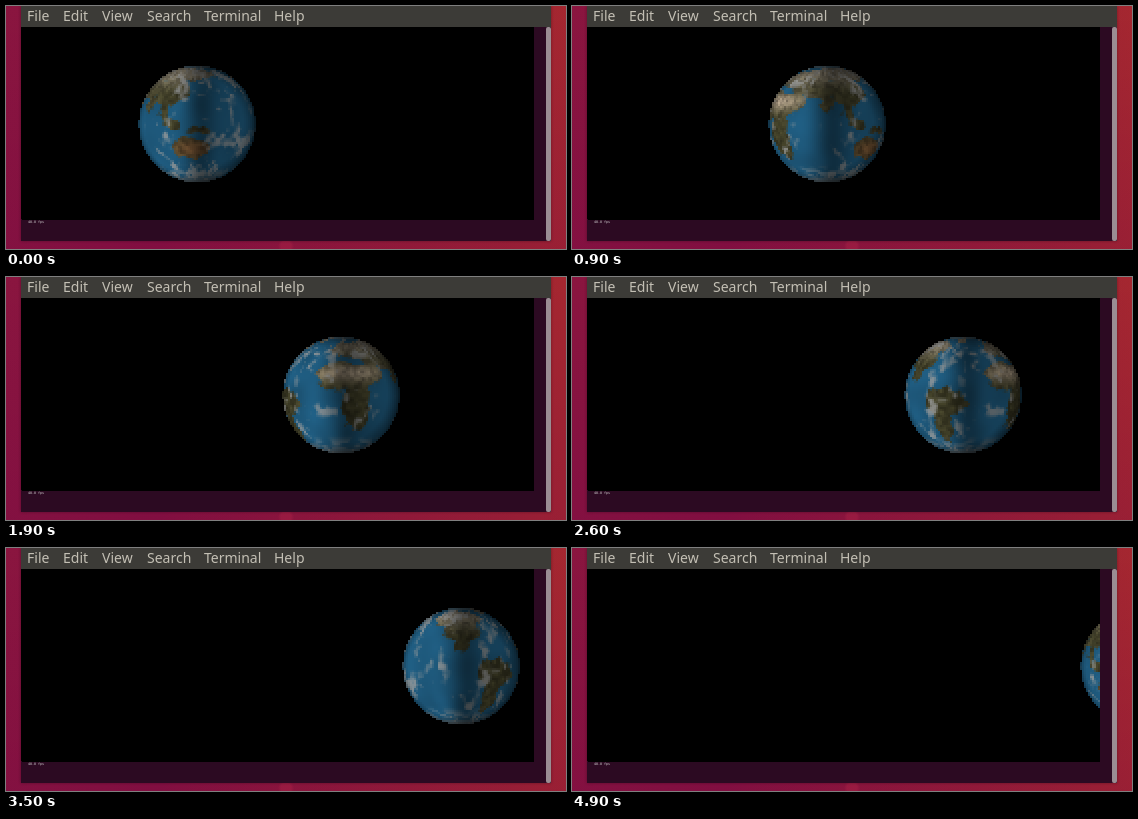
An HTML page with a canvas that plays this animation: 560x243 px, repeating every 5 s.

```html
<!DOCTYPE html>
<html lang="en">
<head>
<meta charset="utf-8">
<title>Globe in a terminal</title>
<style>
  html, body { margin: 0; width: 100%; height: 100%; overflow: hidden; }
  body {
    position: relative;
    background:
      radial-gradient(circle at 280px 240px, #b8284a50 0 5px, transparent 8px),
      linear-gradient(to top, #6c004838, transparent),
      linear-gradient(95deg, #8a153f, #87123f 30%, #a6282f);
  }
  body > * { position: absolute; }
  #window { left: 15px; top: 0; width: 530px; height: 235px; background: #2c0a22; box-shadow: 0 0 3px #0005; }
  #menu {
    left: 15px; top: 0; width: 530px; height: 21px;
    background: #3c3b37; font: 14px/20px "Noto Sans", sans-serif; color: #c3bfb4;
  }
  #menu span { position: absolute; top: 0; }
  #scrollbar { left: 540px; top: 21px; width: 5px; height: 214px; background: #9a8d93; border-radius: 2px; }
  canvas {
    left: 16px; top: 22px; width: 512px; height: 192px;
    background: #000; box-shadow: -1px -1px #000, 0 -1px #000; image-rendering: pixelated;
  }
  #fps { left: 22px; top: 214px; font: 3.32px/4px "DejaVu Sans Mono", monospace; color: #ddd; white-space: pre; }
</style>
</head>
<body>
<div id="window"></div>
<div id="menu">
  <span style="left:6px">File</span>
  <span style="left:42px">Edit</span>
  <span style="left:81px">View</span>
  <span style="left:126px">Search</span>
  <span style="left:183px">Terminal</span>
  <span style="left:253px">Help</span>
</div>
<div id="scrollbar"></div>
<canvas id="screen" width="256" height="96"></canvas>
<div id="fps">48.8 fps</div>
<script>
const RADIUS = 29.2, START_X = 87.6, CENTER_Y = 48, DEGREES = 180 / Math.PI;
const screen2d = document.getElementById('screen').getContext('2d');
const mix = (a, b, t) => a + (b - a) * t;
const blend = (a, b, t) => a.map((v, i) => mix(v, b[i], t));
const bell = (v, center, width) => Math.exp(-(((v - center) / width) ** 2));
function smooth(a, b, v) {
  const t = Math.max(0, Math.min(1, (v - a) / (b - a)));
  return t * t * (3 - 2 * t);
}

function hash(x, y) {
  const s = Math.sin(x * 127.1 + y * 311.7) * 43758.5453;
  return s - Math.floor(s);
}

// Value noise, seamless around the globe; size is in degrees.
function noise(lon, lat, size, seed) {
  const x = (lon + 180) / size, y = lat / size, period = 360 / size;
  const x0 = Math.floor(x), y0 = Math.floor(y);
  const tx = smooth(0, 1, x - x0), ty = smooth(0, 1, y - y0);
  const at = (i, j) => hash((x0 + i) % period + seed, y0 + j);
  return mix(mix(at(0, 0), at(1, 0), tx), mix(at(0, 1), at(1, 1), tx), ty);
}

// Each continent is a union of ellipses with a rough shore.
const ellipse = (lon, lat, width, height) => ({ lon, lat, width, height });
const continents = [
  ellipse(6, 19, 23, 16), ellipse(27, 17, 17, 15), ellipse(25, -8, 15, 27),      // Africa
  ellipse(46, 24, 12, 10), ellipse(28, 53, 36, 13), ellipse(70, 40, 34, 14),     // Arabia, Europe, Iran
  ellipse(102, 60, 66, 15), ellipse(106, 36, 21, 18), ellipse(79, 20, 8, 12),    // Siberia, China, India
  ellipse(102, 11, 5, 14), ellipse(114, 0, 6, 5), ellipse(141, -5, 9, 4),        // South-east Asia
  ellipse(134, -25, 20, 12),                                                     // Australia
  ellipse(-105, 56, 38, 15), ellipse(-99, 38, 23, 12), ellipse(-100, 21, 9, 9),  // North America
  ellipse(-42, 72, 14, 10),                                                      // Greenland
  ellipse(-60, -6, 21, 14), ellipse(-64, -28, 10, 24)                            // South America
];

function landAmount(lon, lat) {
  const rough = (noise(lon, lat, 8, 5) - .5) * 6 + (noise(lon, lat, 3, 9) - .5) * 3;
  const depths = continents.map(c =>
    (1 - Math.hypot((lon - c.lon) / c.width, (lat - c.lat) / c.height)) * Math.min(c.width, c.height));
  return smooth(-1, 1.2, Math.max(...depths) + rough);
}

function landColor(lon, lat) {
  const sahara = bell(lat, 23, 10) * bell(lon, 18, 42);
  const outback = bell(lat, -25, 12) * bell(lon, 134, 25);
  const steppe = smooth(28, 60, lat);
  let color = blend([82, 80, 50], [158, 148, 126], steppe);
  color = blend(color, [152, 108, 66], outback);
  color = blend(color, [212, 192, 164], sahara);
  return color.map(v => v * mix(.72, 1.2, noise(lon, lat, 4, 7)));
}

function cloudAmount(lon, lat) {
  const puffs = .6 * noise(lon, lat, 15, 11) + .4 * noise(lon, lat, 5, 29) + .1 * smooth(36, 58, Math.abs(lat));
  const streaks = smooth(-42, -56, lat) * smooth(.35, .75, noise(lon, lat * 3 + lon * .5 * Math.sin(lon / DEGREES), 15, 51));
  const ice = Math.max(smooth(-62, -74, lat), smooth(70, 82, lat));
  return Math.max(smooth(.58, .86, puffs) * .8, streaks * .45, ice * .65);
}

// One texel per degree.
const earth = Array.from({ length: 180 }, (_, row) => Array.from({ length: 360 }, (_, column) => {
  const lon = column - 180, lat = 90 - row;
  const sea = [38, 112, 156].map(v => v * mix(.9, 1.08, noise(lon, lat, 20, 3)));
  const ground = blend(sea, landColor(lon, lat), landAmount(lon, lat));
  return blend(ground, [192, 194, 194], cloudAmount(lon, lat));
}));

// Day on the left, a dark fold just past the middle, and dim rims.
function lightAt(nx, nz) {
  const day = mix(.8, .53, smooth(-.5, .1, nx));
  const fold = .13 * bell(nx, .1, .22);
  const rim = Math.min(1, mix(.55, .32, smooth(-.8, .6, nx)) + 1.1 * nz);
  return (day - fold) * rim;
}

function drawGlobe(step) {
  const frame = screen2d.createImageData(256, 96);
  const cx = START_X + 4 * step;
  const facing = 139 - 7.2 * step;
  for (let y = 18; y < 78; y++) {
    const ny = (y + .5 - CENTER_Y) / RADIUS;
    for (let x = Math.floor(cx - RADIUS); x < Math.min(256, cx + RADIUS); x++) {
      const nx = (x + .5 - cx) / RADIUS, d2 = nx * nx + ny * ny;
      if (d2 >= 1) continue;
      const nz = Math.sqrt(1 - d2);
      const lon = facing + Math.atan2(nx, nz) * DEGREES;
      const lat = Math.asin(-ny) * DEGREES;
      const texel = earth[Math.floor(90 - lat)][Math.floor(lon + 900) % 360];
      const light = lightAt(nx, nz);
      frame.data.set([...texel.map(v => v * light), 255], 4 * (y * 256 + x));
    }
  }
  screen2d.putImageData(frame, 0, 0);
}

// The picture stutters: some ticks hold it, and the next one catches up.
const heldTicks = [10, 14, 17, 27, 40, 42, 47];
const stepAt = tick => tick - (tick >= 7) - (tick >= 32) - heldTicks.includes(tick);

let lastTick = -1;
function render(now) {
  const tick = Math.floor(now % 5000 / 100);
  if (tick !== lastTick) {
    lastTick = tick;
    drawGlobe(stepAt(tick));
  }
  requestAnimationFrame(render);
}
render(performance.now());
</script>
</body>
</html>
```
